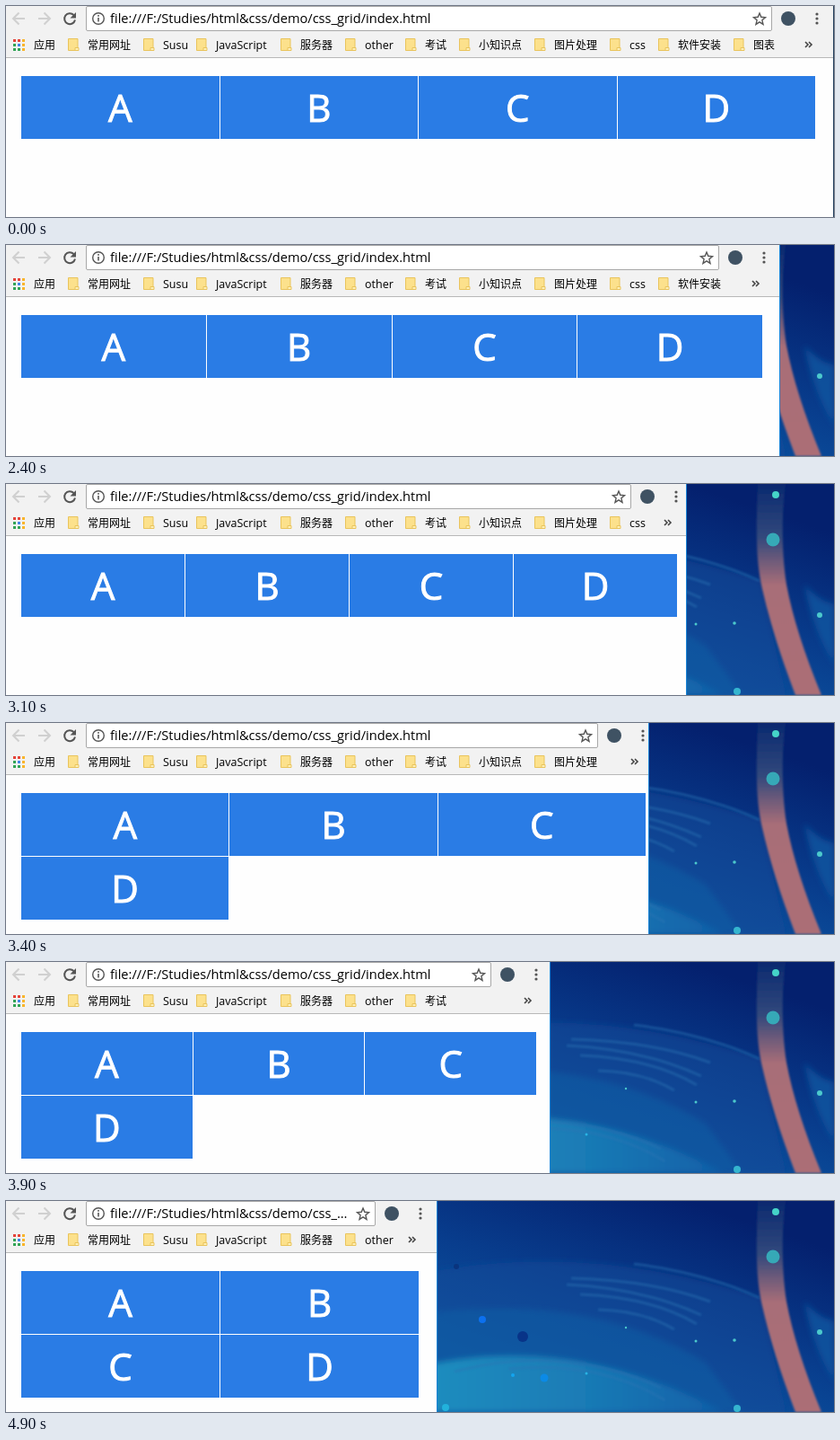
Animation, 923 px wide and 235 px high, one loop 6000 ms. Source, as an HTML page:

```html
<!DOCTYPE html>
<html lang="zh">
<head>
<meta charset="utf-8">
<style>
html, body { margin: 0; width: 100%; height: 100%; overflow: hidden; }
body { position: relative; background: #083c8c; font-family: "Open Sans", "Noto Sans CJK SC", "Noto Sans CJK", sans-serif; }
svg { position: absolute; left: 0; top: 0; }
#win { position: absolute; left: 0; top: 0; height: 235px; overflow: hidden; background: #fefefe; }
#edge { position: absolute; top: 0; width: 1px; height: 235px; }
#bar { position: absolute; width: 100%; height: 57px; background: #f2f2f2; border-bottom: 1px solid #b8b8b8; }
#field { position: absolute; left: 89px; top: 0; height: 28px; box-sizing: border-box; background: #fff; border: 1px solid #a8a8a8; border-radius: 2px; }
#url { position: absolute; left: 116px; top: 0; font-size: 14.6px; line-height: 27px; color: #000; white-space: nowrap; overflow: hidden; text-overflow: ellipsis; }
#grid { position: absolute; left: 17px; top: 78px; display: grid; gap: 1px; grid-auto-rows: 70px; }
#grid div { background: #2a7ce5; color: #fff; font-size: 42px; line-height: 70px; text-align: center; -webkit-text-stroke: 1px #fff; }
#marks text { font-size: 12px; fill: #000; }
#marks text.latin { font-size: 12.5px; }
</style>
</head>
<body>
<svg width="923" height="235">
  <defs>
    <linearGradient id="sky" gradientUnits="userSpaceOnUse" x1="760" y1="0" x2="680" y2="235">
      <stop offset="0" stop-color="#04206e"/><stop offset=".5" stop-color="#083c8c"/><stop offset="1" stop-color="#0c58a4"/>
    </linearGradient>
    <linearGradient id="wave" x1="0" y1="0" x2="1" y2="0">
      <stop offset="0" stop-color="#1f90c0"/><stop offset=".55" stop-color="#1a7cb6"/><stop offset="1" stop-color="#1060a8"/>
    </linearGradient>
    <linearGradient id="ribbon" x1="0" y1="0" x2="0" y2="1">
      <stop offset="0" stop-color="#0a2a70"/><stop offset=".25" stop-color="#32487c"/>
      <stop offset=".36" stop-color="#6c5a7a"/><stop offset=".48" stop-color="#a86e78"/><stop offset="1" stop-color="#ac6e76"/>
    </linearGradient>
    <filter id="soft"><feGaussianBlur stdDeviation="3"/></filter>
    <filter id="brush"><feGaussianBlur stdDeviation=".8"/></filter>
  </defs>
  <rect width="923" height="235" fill="url(#sky)"/>
  <g filter="url(#soft)">
    <path d="M440 85Q640 40 842 108Q850 150 870 235H440Z" fill="#0e4c9a" opacity=".5"/>
    <path d="M440 130Q640 95 780 180L820 235H440Z" fill="#1360a8" opacity=".5"/>
    <path d="M440 190Q620 140 800 235H440Z" fill="url(#wave)"/>
    <path d="M890 112Q905 130 923 134V200Q900 165 890 112Z" fill="#1355a0" opacity=".8"/>
  </g>
  <g filter="url(#brush)" fill="none" stroke="#2a74b4" stroke-width="3" opacity=".45">
    <path d="M700 70Q780 80 840 108M630 86Q720 88 785 112M625 93Q710 97 775 127M640 104Q720 107 770 137M660 121Q710 122 745 143"/>
    <path d="M500 190Q620 158 730 208M560 187Q660 177 735 222"/>
  </g>
  <path d="M838 0C836 55 836 85 843 117Q855 170 880 235H909Q880 165 870 112C864 70 865 30 869 0Z" fill="url(#ribbon)" filter="url(#brush)"/>
  <g id="dots"></g>
</svg>

<div id="win">
  <div id="bar"></div>
  <div id="field"></div>
  <div id="url">file:///F:/Studies/html&amp;css/demo/css_grid/index.html</div>
  <svg width="923" height="58">
    <g fill="none" stroke="#d0d0d0" stroke-width="2">
      <path d="M21 14H9M14.500 7.500L8 14l6.500 6.500M36 14H48M42.500 7.500L49 14l-6.500 6.500"/>
      <path d="M75.500 10A6 6 0 1 0 77 15.500" stroke="#555"/>
      <circle cx="103" cy="14" r="6.300" stroke="#555" stroke-width="1.400"/>
    </g>
    <path d="M78 7v6.500h-6.500z" fill="#555"/>
    <path d="M102.200 10h1.600v1.700h-1.600zM102.200 13h1.600v4.500h-1.600z" fill="#555"/>
    <g id="apps"></g>
    <g id="marks"></g>
    <g id="right">
      <path d="M-82 8l1.800 4.300 4.700.4-3.600 3.100 1.100 4.600-4-2.500-4 2.500 1.100-4.600-3.600-3.100 4.700-.4z" fill="none" stroke="#555" stroke-width="1.400"/>
      <circle cx="-50" cy="14" r="8" fill="#3f5263"/>
      <g fill="#555"><circle cx="-18" cy="9" r="1.600"/><circle cx="-18" cy="14" r="1.600"/><circle cx="-18" cy="19" r="1.600"/></g>
      <path d="M-31 40l3 3-3 3M-27 40l3 3-3 3" fill="none" stroke="#444" stroke-width="1.600"/>
    </g>
  </svg>
  <div id="grid"><div>A</div><div>B</div><div>C</div><div>D</div></div>
  <div id="edge"></div>
</div>

<script>
const $ = id => document.getElementById(id);

// wallpaper specks: x, y, radius, colour
$('dots').innerHTML = [
  [858, 12, 4, '#45d4c8'], [855, 62, 7.5, '#36a9b7'], [907, 146, 3, '#4cc9cc'], [815, 231, 4, '#35b5cf'],
  [769, 156, 1.5, '#4cc9cc'], [812, 155, 1.8, '#4cc9cc'], [691, 141, 1.2, '#4cc9cc'], [647, 192, 1.5, '#29b4e4'],
  [531, 132, 4, '#0c70ee'], [576, 151, 6, '#083488'], [502, 73, 3, '#0a347e'], [600, 197, 4.5, '#0b8ae6'],
  [565, 194, 2, '#14a5ee'], [490, 230, 4, '#22b2dc']
].map(([x, y, r, c]) => `<circle cx="${x}" cy="${y}" r="${r}" fill="${c}"/>`).join('');

const [R, Y, G, B] = ['#e5443a', '#f9b52c', '#32a456', '#4285e8'];
$('apps').innerHTML = [R, R, Y, G, B, Y, G, G, Y].map((c, i) =>
  `<rect x="${8 + i % 3 * 5}" y="${37 + (i / 3 | 0) * 5}" width="3" height="3" fill="${c}"/>`).join('');

// bookmarks: label, text start, text end
const marks = [
  ['应用', 31, 55], ['常用网址', 91, 139], ['Susu', 175, 198], ['JavaScript', 234, 291], ['服务器', 328, 364],
  ['other', 400, 431], ['考试', 467, 491], ['小知识点', 527, 575], ['图片处理', 611, 659], ['css', 695, 712],
  ['软件安装', 749, 797], ['图表', 833, 857]
];
const folder = x => `<path d="M${x} 36.500h10.500v13h-10.500z" fill="#fce18c" stroke="#e9c45c"/>
  <path d="M${x + 7.500} 46.500h4v3h-4z" fill="#fff0b8" stroke="#e9c45c"/>`;
$('marks').innerHTML = marks.map(([s, x], i) =>
  `<g>${i ? folder(Math.round(x - 22) + .5) : ''}<text x="${x}" y="48" class="${/\w/.test(s) ? 'latin' : ''}">${s}</text></g>`).join('');

// time, window width, toolbar width, page width (contents lag behind the window)
const keys = [
  [2000, 923, 922, 922], [2700, 818, 819, 819], [2800, 801, 801, 802], [3400, 717, 728, 733], [3900, 607, 609, 611],
  [4100, 594, 597, 600], [4400, 534, 537, 542], [4700, 500, 501, 502], [4800, 497, 497, 497], [4900, 481, 480, 480]
];

function sizes(t) {
  const i = keys.findIndex(k => k[0] >= t);
  if (i < 1) return keys.at(i).slice(1);
  const a = keys[i - 1], b = keys[i], p = (t - a[0]) / (b[0] - a[0]);
  return [1, 2, 3].map(j => Math.round(a[j] + (b[j] - a[j]) * p));
}

function draw(now) {
  const t = Math.floor(now % 6000 / 100) * 100;
  const [win, bar, page] = sizes(t);
  $('win').style.width = win + 'px';
  $('edge').style.left = win - 1 + 'px';
  $('edge').style.background = t < 1800 ? '#24405f' : '#1883d7';
  $('field').style.width = bar - 157 + 'px';
  $('url').style.width = bar - 213 + 'px';
  $('right').setAttribute('transform', `translate(${bar})`);
  marks.forEach((m, i) => $('marks').children[i].style.display = m[2] + 8 < bar - 36 ? '' : 'none');
  const cols = page > 750 ? 4 : page > 500 ? 3 : 2;
  $('grid').style.width = page - 37 + 'px';
  $('grid').style.gridTemplateColumns = `repeat(${cols}, 1fr)`;
  requestAnimationFrame(() => draw(performance.now()));
}
draw(performance.now());
</script>
</body>
</html>
```
